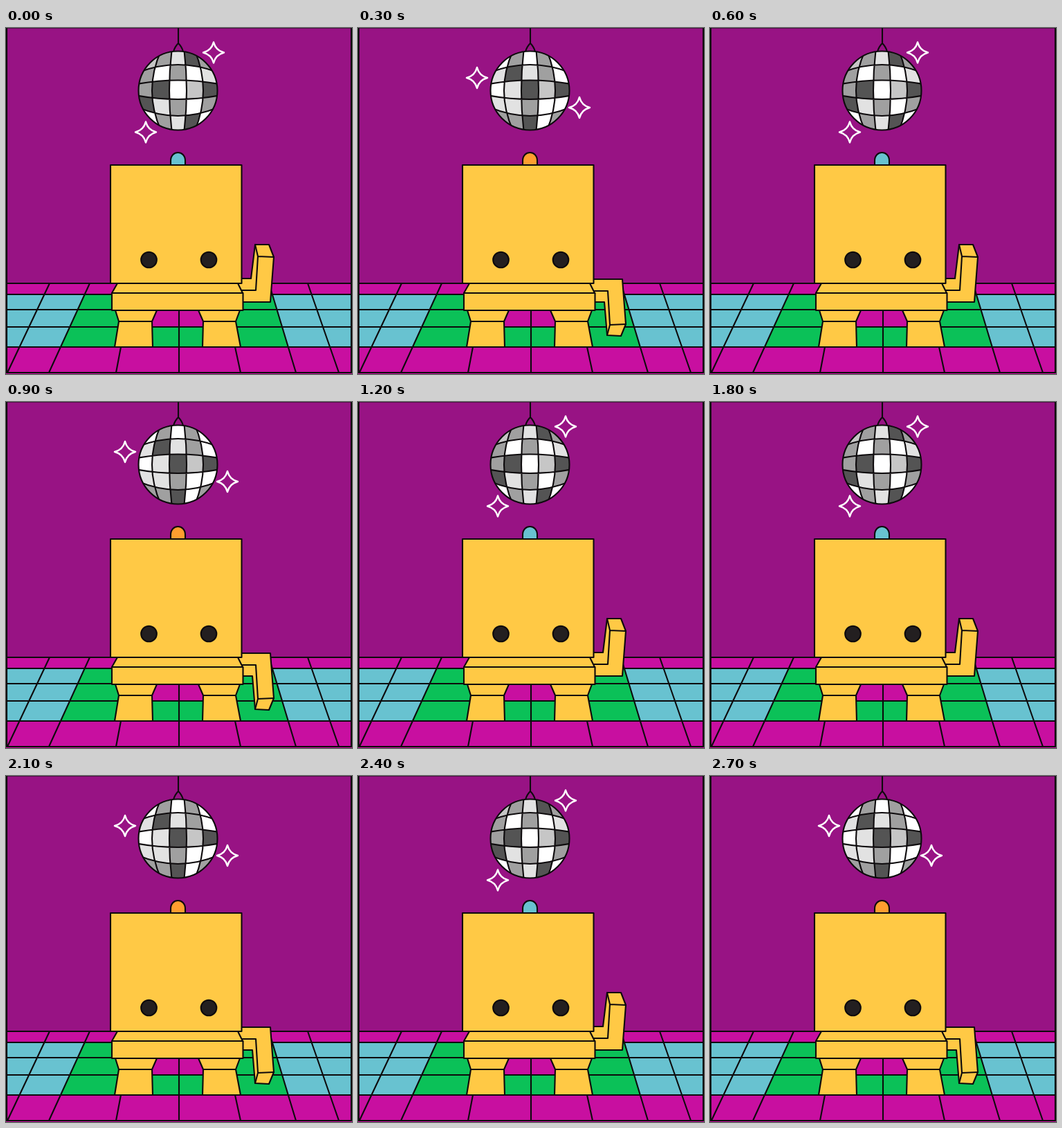
Animation, 500 px wide and 500 px high, one loop 3 s. Source, as an HTML page:

```html
<!DOCTYPE html>
<html lang="en">
<head>
<meta charset="utf-8">
<title>Disco robot</title>
<style>
html, body { margin: 0; width: 100%; height: 100%; overflow: hidden; background: #981384; }
svg { display: block; width: 100%; height: 100%; }
.ink { stroke: #0d0a0c; stroke-width: 2.1; stroke-linejoin: round; stroke-linecap: round; }
.line { fill: none; }
.gold { fill: #ffc945; }
.spark { fill: none; stroke: #fff; stroke-width: 2.5; stroke-linejoin: round; }
.up { animation: beat 600ms step-end infinite; }
.down { animation: rest 600ms step-end infinite; }
@keyframes beat { 0% { visibility: visible; } 50%, 100% { visibility: hidden; } }
@keyframes rest { 0% { visibility: hidden; } 50%, 100% { visibility: visible; } }
</style>
</head>
<body>
<svg viewBox="0 0 500 500">
  <defs>
    <clipPath id="round"><circle cx="248.5" cy="90.5" r="57"/></clipPath>
    <path id="star" d="M0-15Q3-3 15 0Q3 3 0 15Q-3 3-15 0Q-3-3 0-15Z"/>
  </defs>
  <rect width="500" height="500" fill="#981384"/>

  <!-- floor -->
  <rect y="369" width="500" height="131" fill="#c80fa0"/>
  <rect y="385" width="500" height="76" fill="#68c2d0"/>
  <path fill="#0bc158" d="M113.500 385H385L408 461H79Z"/>
  <path fill="#c80fa0" d="M205 385H295V432H200Z"/>
  <path class="ink line" d="M0 369H500M0 385H500M0 407H500M0 432H500M0 461H500
    M63 369L2 498M121 369L62 498M166 461L159 498M250 369V498M331 461L339 498M380 369L419 498M436 369L481 498"/>
  <path class="ink line" d="M1 0V498H499V0"/>
  <path stroke="#0d0a0c" d="M0 0H500"/>

  <!-- mirror ball -->
  <path class="ink line" d="M249 0V22M242 34Q244 27 249 22Q254 27 256 34"/>
  <g clip-path="url(#round)">
    <g id="tilesUp" class="up"></g>
    <g id="tilesDown" class="down"></g>
    <path id="mesh" class="ink line"/>
  </g>
  <circle class="ink line" cx="248.5" cy="90.5" r="57"/>

  <g class="up">
    <use href="#star" class="spark" x="300" y="35.5"/>
    <use href="#star" class="spark" x="202" y="150.5"/>
    <path class="ink gold" d="M335 362H354L360 313H380L387 331L382 396H335Z"/>
    <path class="ink line" d="M360 313L364 330L387 331M364 330L361 379H335"/>
  </g>
  <g class="down">
    <use href="#star" class="spark" x="172" y="72"/>
    <use href="#star" class="spark" x="320" y="115"/>
    <path class="ink gold" d="M335 363H382L387 428L380 445L360 444L356 396H335Z"/>
    <path class="ink line" d="M335 380H361L364 429L387 428M364 429L360 444"/>
  </g>

  <!-- robot -->
  <g class="ink">
    <path class="up" fill="#68c2d0" d="M238 198V192C238 176 259 176 259 192V198Z"/>
    <path class="down" fill="#ff9e2f" d="M238 198V192C238 176 259 176 259 192V198Z"/>
    <g class="gold">
      <path d="M158 408H218L211 424H163Z"/>
      <path d="M163 424H211L212 461H157Z"/>
      <path d="M278 408H338L332 424H285Z"/>
      <path d="M285 424H332L339 461H284Z"/>
      <path d="M161 369H335L342 383H153Z"/>
      <path d="M153 383H342.500V408H153Z"/>
      <path d="M151 198H340.500V369H151Z"/>
    </g>
    <g fill="#231f20">
      <circle cx="206.5" cy="335" r="11.3"/>
      <circle cx="293" cy="335" r="11.3"/>
    </g>
  </g>
</svg>
<script>
const CX = 248.5, CY = 90.5, EDGE = 62;
// each line: [position at the middle, bend]
const cols = [[-EDGE, 0], [-37.5, 15], [-12.5, 4], [12.5, -4], [36.5, -14], [EDGE, 0]];
const rows = [[-EDGE, 0], [-37.5, 13], [-15, 6], [12.5, -6], [36.5, -14], [EDGE, 0]];
const shade = { w: '#fff', e: '#e2e2e2', l: '#c6c6c6', g: '#a0a0a0', d: '#545454' };
const at = ([mid, bend], t) => mid + bend * (t / EDGE) ** 2;

function corner(c, r) {
  let x = cols[c][0], y = rows[r][0];
  for (let i = 0; i < 6; i++) {
    x = at(cols[c], y);
    y = at(rows[r], x);
  }
  return `${CX + x},${CY + y}`;
}

function tiles(id, pattern) {
  document.getElementById(id).innerHTML = pattern.split(' ').map((row, r) =>
    [...row].map((key, c) => {
      const pts = [corner(c, r), corner(c + 1, r), corner(c + 1, r + 1), corner(c, r + 1)];
      return `<polygon points="${pts.join(' ')}" fill="${shade[key]}"/>`;
    }).join('')).join('');
}

tiles('tilesUp', 'lgedg gwgwe gdwld degwg wgedw');
tiles('tilesDown', 'wgwgw edegw wedld eegww ggdwg');

let d = '';
for (const [m, b] of rows.slice(1, 5))
  d += `M${CX - EDGE} ${CY + m + b}Q${CX} ${CY + m - b} ${CX + EDGE} ${CY + m + b}`;
for (const [m, b] of cols.slice(1, 5))
  d += `M${CX + m + b} ${CY - EDGE}Q${CX + m - b} ${CY} ${CX + m + b} ${CY + EDGE}`;
document.getElementById('mesh').setAttribute('d', d);
</script>
</body>
</html>
```
